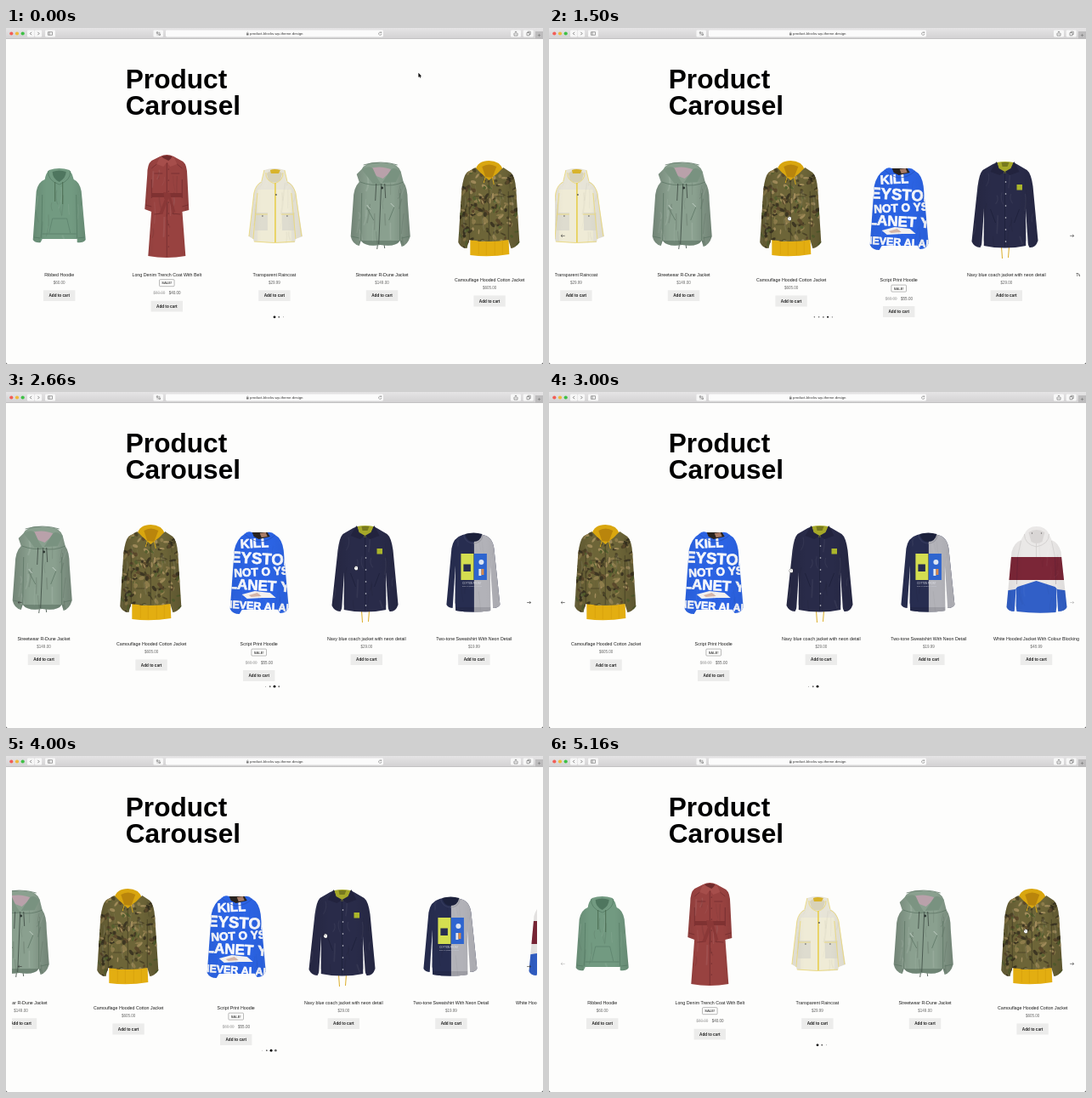
An HTML page with a canvas for the animation above (5.33 s loop, 632 px wide and 395 px high).

```html
<!DOCTYPE html>
<html lang="en">
<head>
<meta charset="utf-8">
<title>Product Carousel</title>
<style>
html, body { margin: 0; width: 100%; height: 100%; overflow: hidden; background: #fdfdfc; }
canvas { display: block; width: 632px; height: 395px; }
</style>
</head>
<body>
<canvas id="stage"></canvas>
<script>
const W = 632, H = 395, LOOP = 5330, STEP = 1000 / 6;
const PITCH = 126.6, FIRST = 62.7;
const PAPER = '#fdfdfc';
const FONT = '"Liberation Sans", Arial, sans-serif';
const canvas = document.getElementById('stage');
const dpr = window.devicePixelRatio || 1;
canvas.width = W * dpr;
canvas.height = H * dpr;
const c = canvas.getContext('2d');

// ---------- helpers ----------
function fill(color, d) {
  c.fillStyle = color;
  c.fill(new Path2D(d));
}
function line(color, w, d) {
  c.strokeStyle = color;
  c.lineWidth = w;
  c.stroke(new Path2D(d));
}
function rect(color, x, y, w, h, r = 0) {
  c.fillStyle = color;
  c.beginPath();
  c.roundRect(x, y, w, h, r);
  c.fill();
}
function dot(color, x, y, r) {
  c.fillStyle = color;
  c.beginPath();
  c.arc(x, y, r, 0, 7);
  c.fill();
}
function text(s, x, y, size, color = '#111', weight = 400, align = 'center') {
  c.font = `${weight} ${size}px ${FONT}`;
  c.textAlign = align;
  c.fillStyle = color;
  c.fillText(s, x, y);
}
function random(seed) {
  return () => (seed = (seed * 16807) % 2147483647) / 2147483647;
}

// Fill an outline, paint details inside it, then add soft folds and edge shade.
function cloth(color, d, seed, inside, depth = 0.14) {
  const p = new Path2D(d), rnd = random(seed);
  c.save();
  c.fillStyle = color;
  c.fill(p);
  c.clip(p);
  if (inside) inside();
  for (let i = 0; i < 26; i++) {
    const x = rnd() * 70 - 35, y = 165 + rnd() * 85, l = 8 + rnd() * 18;
    c.strokeStyle = i % 2 ? `rgba(0,0,0,${depth * 0.5})` : `rgba(255,255,255,${depth * 0.5})`;
    c.lineWidth = 0.6 + rnd() * 1.4;
    c.beginPath();
    c.moveTo(x, y);
    c.quadraticCurveTo(x + rnd() * 6 - 3, y + l / 2, x + rnd() * 8 - 4, y + l);
    c.stroke();
  }
  const g = c.createLinearGradient(-37, 0, 37, 0);
  const dark = `rgba(0,0,0,${depth})`;
  g.addColorStop(0, dark);
  g.addColorStop(0.3, 'rgba(0,0,0,0)');
  g.addColorStop(0.7, 'rgba(0,0,0,0)');
  g.addColorStop(1, dark);
  c.fillStyle = g;
  c.fillRect(-45, 140, 90, 140);
  c.restore();
}

// Open wedges between the body and both sleeves.
function gaps(x, top, bottom, w) {
  for (const s of [-1, 1]) fill(PAPER, `M${s * x} ${top}L${s * (x + 0.5)} ${bottom}H${s * (x + 0.5 + w)}Z`);
}

// ---------- garments, x relative to the slide centre ----------
function hoodie() {
  cloth('#729a81', 'M-12 167Q0 163 12 167Q16 172 17 178Q24 181 26 192L31 249Q28 253 21 252L21 248H-20L-22 252Q-28 253 -31 249L-27 192Q-25 181 -17 178Q-16 171 -12 167Z', 11);
  fill('#4f765f', 'M-8 169Q0 166 8 169Q8 176 0 181Q-8 177 -8 169Z');
  line('#567b65', 0.8, 'M-13 168Q-14 179 0 184Q14 179 13 168M-20 196L-21 247M20 196L21 247M-20 242H20M-30 246L-22 247M30 246L22 247');
  line('#5b806a', 0.7, 'M-12 241L-8 224H9L13 241');
  line('#48694f', 0.9, 'M-5 181L-5 204M4 181L4 207');
}
function trench() {
  cloth('#984240', 'M-8 151Q0 147 8 151L19 157Q24 161 24 174L26 214L18 216L17 200L22 268Q0 272 -22 268L-17 200L-18 216L-26 213L-23 172Q-23 160 -18 156Z', 23);
  fill('#6f2b2c', 'M-6 151Q0 149 6 151L1 160Z');
  fill('#a64e4b', 'M-8 151L-12 160L-4 163L0 158L4 163L12 160L8 151L2 156Z');
  line('#6d2a2b', 0.7, 'M0 159V269M-18 178V200M18 178V200M-15 171H-5M5 171H15M-15 219L-6 218M6 218L16 219M-25 208L-18 210M25 208L18 210M-12 160L-18 165M12 160L18 165');
  fill('#7f3232', 'M-18 194H18L18 199H-18Z');
  fill('#8a3837', 'M-4 193L4 194L5 200L-3 201ZM-2 200L2 200L-5 219L-9 218ZM2 200L5 200L10 216L7 217Z');
  for (let y = 166; y < 260; y += 13) dot('#5b2224', 2, y, 0.6);
}
function raincoat() {
  cloth('#e7e4d7', 'M-12 167Q0 163 12 167L15 180Q22 183 25 193L33 245L25 248L24 252Q0 254 -24 251L-25 248L-30 245L-24 194Q-21 183 -15 180Z', 37, () => {
    rect('rgba(244,240,214,.65)', -20, 190, 40, 62);
    rect('#dedccf', -23, 217, 15, 21);
    rect('#dedccf', 9, 217, 15, 21);
  }, 0.06);
  fill('#d8d2b9', 'M-9 171Q0 163 9 171L7 179Q0 184 -7 179Z');
  fill('#d8b32c', 'M-5 167Q0 165 7 167L5 171L-4 171Z');
  line('#ead97c', 0.9, 'M-12 167L-15 180M12 167L15 180M-10 170Q-11 179 0 183Q11 179 10 170M-15 181Q-22 184 -24 194L-30 245M15 181Q22 184 25 194L32 245M-24 251Q0 254 24 251M-20 194L-25 248M20 194L25 248M-23 219H-8M8 219H23');
  line('#e7cd45', 1.5, 'M1 182V252');
  dot('#555', 2, 196, 0.9);
  dot('#555', -14, 221, 0.8);
  dot('#555', 15, 221, 0.8);
}
function jacket() {
  line('#34433a', 0.8, 'M-3 252L-4 260M4 252L5 259');
  cloth('#8aa08f', 'M-22 166Q-18 158 -4 158L9 159Q20 159 24 169L27 181Q32 188 32 203L35 245Q32 255 25 257L23 250Q18 258 0 255Q-17 258 -23 250L-25 256Q-33 254 -35 245L-32 203Q-32 188 -25 181L-28 172Z', 51, () => {
    rect('rgba(60,85,69,.35)', -25, 250, 50, 8);
  }, 0.2);
  fill('#b9a1aa', 'M-13 165Q2 161 14 167L3 177L-5 174Z');
  fill('#7c9482', 'M-22 166Q-13 161 -9 165L-4 176L1 184L-9 183Z');
  fill('#799280', 'M24 169Q15 162 12 167L2 182L18 181Z');
  line('#5f7666', 0.8, 'M-20 161Q0 155 20 161M-24 181Q-10 186 1 184Q14 187 27 181M-22 194L-23 250M23 194L23 250M-16 211L-8 226M16 211L10 226M-34 245L-25 247M34 245L25 247');
  line('#4a5a50', 1, 'M1 183L-2 254');
  line('#313c36', 0.7, 'M-5 183L-6 203M5 183L6 200');
  line('#d6e0d9', 0.7, 'M-16 208L-12 213M12 206L16 210');
  dot('#2e3833', 2, 188, 1.4);
}
function camo() {
  fill('#d9a60f', 'M-16 167Q-13 156 0 156Q13 156 17 167L10 181L-9 181Z');
  fill('#b9850c', 'M-8 163Q0 158 9 163L4 176L-4 175Z');
  fill('#e3ae11', 'M-22 242H23L24 266Q0 270 -22 267Z');
  line('#d39d0d', 0.6, 'M-12 246V266M-3 246V267M7 246V267M16 246V266');
  cloth('#6d6538', 'M-16 164L-9 171L0 179L10 171L17 164L26 170Q31 175 32 190L36 252Q31 259 26 259L23 249Q0 253 -23 249L-26 259Q-33 259 -36 252L-32 190Q-30 174 -26 170Z', 67, () => {
    const rnd = random(91), shades = ['#3d3622', '#8d7c4b', '#4d4527', '#57602f', '#a08b5a', '#5c4a2c'];
    for (let i = 0; i < 230; i++) {
      c.fillStyle = shades[i % shades.length];
      const x = rnd() * 76 - 38, y = 162 + rnd() * 100;
      c.beginPath();
      c.ellipse(x, y, 1.4 + rnd() * 3, 0.8 + rnd() * 1.6, rnd() * 3, 0, 7);
      c.fill();
    }
  }, 0.16);
  line('#3a3520', 0.6, 'M0 179V250M-23 192L-23 249M23 192L23 249M-17 198H-5M6 198H18M-17 231H-5M6 231H18');
  line('#e4b31b', 0.9, 'M-4 175L-6 182M4 175L6 184');
}
function script() {
  cloth('#2b63e3', 'M-17 167Q-14 163 -8 165L10 165Q15 164 19 168Q27 172 29 186L35 253Q33 260 25 260L22 256H-20L-23 261Q-31 261 -34 255L-29 186Q-26 172 -17 167Z', 83, () => {
    const rows = [['KILL', -5, 183, 15], ['EYSTOI', 0, 202, 18.5], ['NOT O YS', 3, 216, 13.5], ['LANET Y', 0, 233, 17], ['NEVER ALAN', 0, 256, 12.5]];
    c.strokeStyle = '#f7f8fc';
    c.lineWidth = 0.7;
    c.lineJoin = 'round';
    for (const [s, x, y, size] of rows) {
      c.save();
      c.translate(x, y);
      c.rotate(y % 3 ? 0.06 : -0.05);
      text(s, 0, 0, size, '#f7f8fc', 700);
      c.strokeText(s, 0, 0);
      c.restore();
    }
    fill('#f3f1ef', 'M-20 238L-5 234L13 236L20 242L4 242L-14 243Z');
    fill('#d4b5a8', 'M-12 239L-2 236L3 240L-9 241Z');
  }, 0.06);
  fill('#28231f', 'M-8 165H10L13 170L0 173L-6 170Z');
  fill('#a77b65', 'M1 166L8 165L10 170L3 171Z');
  line('#244fb6', 0.7, 'M-17 167Q-6 176 0 176Q11 176 19 168');
}
function coach() {
  line('#dcae28', 1, 'M-4 257L-3 271M5 257L4 270');
  cloth('#292b49', 'M-14 160L-9 158H10L14 160L26 167Q31 171 33 186L39 250Q36 259 29 258L25 250L25 256Q0 261 -25 256L-25 250L-29 258Q-36 258 -39 251L-32 186Q-30 171 -26 167Z', 97, null, 0.1);
  gaps(24.5, 212, 259, 2.6);
  fill('#a6a829', 'M-9 158Q0 156 10 158L7 166L0 171L-7 166Z');
  fill('#77791f', 'M-4 158H5L3 163H-3Z');
  fill('#22233e', 'M-10 157L-17 169L-6 173L0 169L-7 165ZM11 157L17 169L6 173L0 169L7 165Z');
  line('#1c1f38', 0.7, 'M0 169V257M-17 213L-11 229M17 213L11 229');
  for (let y = 181; y < 256; y += 14) dot('#d5d5dc', 1, y, 0.8);
  rect('#aab52b', 14, 184, 6.5, 6.5);
}
function sweatshirt() {
  cloth('#272d50', 'M-12 168Q0 164 12 168Q23 170 25 184L32 250Q30 254 24 254L22 248L21 257Q0 260 -20 257L-21 248L-23 254Q-29 254 -31 250L-25 184Q-23 171 -12 168Z', 113, () => {
    rect('#b2b2b8', 1.5, 160, 35, 102);
    rect('#232848', -21, 253, 22.5, 8);
    rect('#9d9da4', 1.5, 253, 22, 8);
  }, 0.07);
  gaps(20.5, 204, 258, 3);
  fill('#1c213b', 'M-9 167Q1 164 11 167Q9 176 1 176Q-7 176 -9 167Z');
  line('#343a5c', 1.2, 'M-11 168Q-8 178 1 178');
  line('#9b9ba2', 1.2, 'M1 178Q10 178 12 168');
  rect('#d4de50', -14, 190, 15, 31);
  rect('#272d50', -11, 202.5, 8.5, 8.5);
  rect('#2e65cf', 1.5, 190, 15, 31);
  dot('#dce5f3', 10, 200, 3);
  rect('#e4e8ef', 7, 208, 3, 8);
  rect('#d88a4c', 10, 208, 3, 7);
  text('COTTON FRONT', -1, 226, 2.8, '#dfe2ea');
  text('SOFT FLEECE CREW', -1, 229, 2.3, '#c9cdd8');
}
function anorak() {
  cloth('#eae8e7', 'M-14 167Q-10 158 0 158Q11 158 15 167L18 174Q26 177 29 188L36 253Q34 258 25 258L24 252L23 259Q0 261 -23 258L-24 252L-26 258Q-33 258 -35 253L-29 188Q-26 177 -18 174Z', 131, () => {
    rect('#7b2637', -40, 194, 80, 27);
    fill('#315fc7', 'M-40 234L-25 232L-22 229L0 222L22 229L25 232L40 234V265H-40Z');
  }, 0.06);
  gaps(23.5, 225, 260, 1.8);
  fill('#d9d6d5', 'M-9 165Q0 159 10 165L7 176Q0 180 -6 176Z');
  line('#d0cdcc', 0.8, 'M-14 167Q-14 179 0 182Q15 179 15 167M0 178V194M-18 175L-22 194M18 175L22 194');
  line('rgba(40,20,50,.3)', 0.6, 'M-22 194L-23 226M22 194L23 226');
  dot('#6b6868', -5, 166, 0.7);
  dot('#6b6868', 6, 166, 0.7);
}

const products = [
  { name: 'Ribbed Hoodie', price: '$60.00', draw: hoodie },
  { name: 'Long Denim Trench Coat With Belt', was: '$60.00', price: '$40.00', draw: trench },
  { name: 'Transparent Raincoat', price: '$29.99', draw: raincoat },
  { name: 'Streetwear R-Dune Jacket', price: '$149.00', shift: -1.8, draw: jacket },
  { name: 'Camouflage Hooded Cotton Jacket', price: '$605.00', drop: 6.4, shift: -0.8, draw: camo },
  { name: 'Script Print Hoodie', was: '$60.00', price: '$55.00', drop: 6.4, draw: script },
  { name: 'Navy blue coach jacket with neon detail', price: '$29.00', shift: -1.8, draw: coach },
  { name: 'Two-tone Sweatshirt With Neon Detail', price: '$19.99', shift: -1.5, draw: sweatshirt },
  { name: 'White Hooded Jacket With Colour Blocking', price: '$48.99', draw: anorak }
];

function slide(p, x) {
  c.save();
  c.translate(x + (p.shift || 0), 0);
  p.draw();
  c.translate(-(p.shift || 0), p.drop || 0);
  text(p.name, 0, 291.5, 5.3, '#1c1c1c');
  let y = 0;
  if (p.was) {
    y = 12.5;
    c.strokeStyle = '#777';
    c.lineWidth = 0.5;
    c.beginPath();
    c.roundRect(-8.8, 295.7, 17.6, 8, 1);
    c.stroke();
    text('SALE!', 0, 301.1, 4, '#444', 700);
    text(p.was, -9, 313.2, 4.5, '#aaa');
    rect('#aaa', -16, 311.4, 14, 0.5);
    text(p.price, 9.3, 313.2, 4.5, '#555');
  } else {
    text(p.price, 0, 300.7, 4.5, '#666');
  }
  rect('#ececeb', -18.7, 308.2 + y, 37.4, 12.8);
  text('Add to cart', 0, 316.3 + y, 4.65, '#222', 700);
  c.restore();
}

// ---------- motion: [step, value...] keys ----------
const scrollKeys = [[0, 0], [7, 0], [8, 105], [9, 284], [10, 358], [11, 379.8], [15, 379.8], [16, 398], [17, 470], [18, 502], [19, 506.4],
  [22, 506.4], [23, 495], [24, 425], [25, 310], [26, 258], [27, 253.2], [28, 253.2], [29, 140], [30, 22], [31, 0]];
const cursorKeys = [[0, 486, 55], [1, 487, 58], [7, 587, 225], [8, 470, 224], [9, 283, 224], [11, 262, 222], [15, 430, 207],
  [16, 412, 207], [18, 285, 210], [22, 270, 211], [23, 282, 211], [25, 470, 212], [28, 214, 213], [31, 561, 206]];
const riseKeys = [[0, 0], [9, 0], [10, 4.4], [11, 6.4], [29, 6.4], [30, 1.2], [31, 0]];
const dotMoves = { 9: [0, 3, 0.48], 17: [3, 4, 0.6], 24: [4, 3, 0.5], 25: [3, 2, 0.6], 29: [2, 1, 0.7], 30: [1, 0, 0.7] };

function at(keys, k, i = 1) {
  const n = keys.findIndex(key => key[0] >= k);
  const b = keys[n], a = keys[Math.max(0, n - 1)];
  return b[0] === k ? b[i] : a[i] + (b[i] - a[i]) * (k - a[0]) / (b[0] - a[0]);
}
function activeAt(k) {
  return k < 9 ? 0 : k < 17 ? 3 : k < 24 ? 4 : k < 29 ? 2 : 0;
}

function bullets(k, y) {
  const settled = activeAt(k);
  const [from, to, m] = dotMoves[k] || [settled, settled, 1];
  const pos = from + (to - from) * m * m;
  const size = d => Math.max(0, 1 - Math.abs(d) / 3);
  for (let i = 0; i < 5; i++) {
    const s = size(i - from) * (1 - m) + size(i - to) * Math.sqrt(m);
    if (s > 0.02) dot(i === to ? '#000' : '#666', 316 + 5.25 * (i - pos), y, 1.4 * s);
  }
}

function arrow(x, y, dir, alpha) {
  c.globalAlpha = alpha;
  line('#333', 0.6, `M${x - 2.3 * dir} ${y}H${x + 2.3 * dir}M${x + 0.6 * dir} ${y - 1.5}L${x + 2.3 * dir} ${y}L${x + 0.6 * dir} ${y + 1.5}`);
  c.globalAlpha = 1;
}

function pointer(x, y, hand) {
  c.save();
  c.translate(x, y);
  c.lineJoin = 'round';
  const shape = hand
    ? 'M-2 -.6L-1.2 -.9V-2Q-.5 -2.7 0 -1.9Q.8 -2.5 1.1 -1.7Q2 -1.8 2 -.8V.9L1.4 2.3H-.9L-2.1 .5Z'
    : 'M-.6 -2.2V3L.6 2L1.4 3.7L2.2 3.3L1.5 1.7L3 1.5Z';
  line(hand ? '#333' : '#fff', hand ? 0.7 : 1, shape);
  fill(hand ? '#fff' : '#000', shape);
  if (hand) line('#555', 0.3, 'M-.4 -1.6V0M.6 -1.4V0');
  c.restore();
}

// ---------- browser window ----------
function toolbar() {
  const g = c.createLinearGradient(0, 0, 0, 13);
  g.addColorStop(0, '#e5e4e5');
  g.addColorStop(1, '#d2d1d2');
  c.fillStyle = g;
  c.fillRect(0, 0, W, 13);
  rect('#b4b3b4', 0, 12.4, W, 0.6);
  ['#f25e57', '#f0b93a', '#3fc046'].forEach((color, i) => dot(color, 6.3 + i * 6.7, 6.5, 2.1));
  for (const [x, w] of [[25, 8.3], [33.8, 8.3], [46, 12], [173.5, 11.5], [594, 12], [608.7, 12]]) rect('#f7f7f7', x, 2.5, w, 8, 1.2);
  line('#555', 0.7, 'M30 4.8L28.4 6.5L30 8.2M37.4 4.8L39 6.5L37.4 8.2');
  line('#666', 0.6, 'M49.5 4.7H54.5V8.3H49.5ZM51.2 4.7V8.3M177.3 4.8H179V6.3H177.3ZM179.8 6.9H181.5V8.4H179.8ZM177.5 8H178.7M180 5.3H181.3');
  line('#666', 0.6, 'M598.6 6H598V9H602V6H601.4M600 7.5V4M599 4.9L600 3.9L601 4.9M613 5.5H616V8.8H613ZM614.2 5.5V4.2H617.2V7.5H616');
  rect('#fbfbfb', 188, 2.5, 256, 8, 1.4);
  rect('#777', 283, 6.2, 2.6, 2.2, 0.3);
  line('#777', 0.5, 'M283.6 6.3V5.4Q284.3 4.3 285 5.4V6.3');
  text('product-blocks.wp-theme.design', 287, 8.2, 4.35, '#333', 400, 'left');
  line('#777', 0.6, 'M441.5 5.4A1.7 1.7 0 1 0 442 6.8M441.8 4.2V5.6H440.4');
  rect('#bdbcbd', 623, 4, 9, 9);
  line('#777', 0.6, 'M627.5 6.8V10.2M625.8 8.5H629.2');
}

function paint(k) {
  c.setTransform(dpr, 0, 0, dpr, 0, 0);
  rect(PAPER, 0, 0, W, H);
  text('Product', 140.8, 70.6, 31.6, '#000', 700, 'left');
  text('Carousel', 140.8, 102.4, 31.6, '#000', 700, 'left');

  c.save();
  c.beginPath();
  c.rect(7, 140, 618, 215);
  c.clip();
  const scroll = at(scrollKeys, k);
  products.forEach((p, i) => {
    const x = FIRST + i * PITCH - scroll;
    if (x > -55 && x < W + 55) slide(p, x);
  });
  c.restore();

  const rise = at(riseKeys, k), active = activeAt(k);
  bullets(k, 339.8 + rise);
  const x = at(cursorKeys, k, 1), y = at(cursorKeys, k, 2), over = y > 148;
  if (over) {
    arrow(16.4, 244.3 + rise / 2, -1, active === 0 ? 0.35 : 1);
    arrow(615.4, 244.3 + rise / 2, 1, active === 4 ? 0.35 : 1);
  }
  toolbar();
  fill('#333', 'M0 393V395H2Q0 395 0 393ZM632 392.5V395H629.5Q632 395 632 392.5Z');
  pointer(x, y, over);
}

let shown = -1;
const start = performance.now();
function tick() {
  const t = (performance.now() - start) % LOOP;
  const k = Math.min(31, Math.floor((t + 7) / STEP));
  if (k !== shown) paint(shown = k);
  requestAnimationFrame(tick);
}
tick();
</script>
</body>
</html>
```
